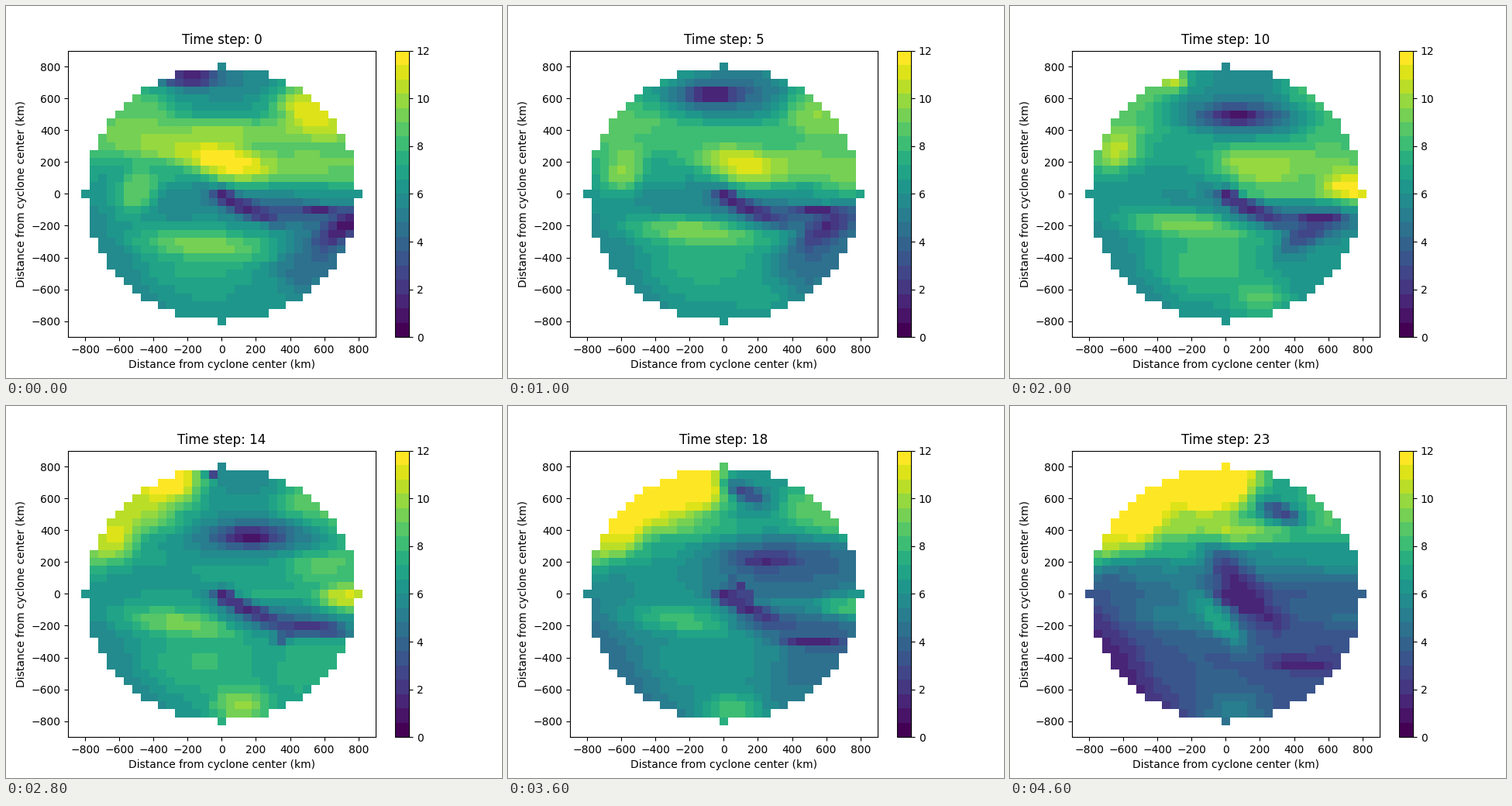
A matplotlib script that plays this animation: 640 by 480 pixels, repeating every 4.8 s.

```python
import numpy as np
import matplotlib.pyplot as plt
from matplotlib.animation import FuncAnimation

STEPS = 24
INTERVAL = 200
RADIUS = 800

km = np.arange(-RADIUS, RADIUS + 1, 50)
X, Y = np.meshgrid(km, km)
OUTSIDE = np.hypot(X, Y) > RADIUS


def ramp(t, start, end):
    """Smooth rise from 0 to 1 between two steps."""
    u = np.clip((t - start) / (end - start), 0, 1)
    return u * u * (3 - 2 * u)


def bump(t, peak, width):
    return np.exp(-((t - peak) / width) ** 2)


def paint(z, value, x, y, rx, ry, tilt=0, scale=1):
    """Pull the field towards a value inside a soft ellipse."""
    if scale < .02:
        return
    c, s = np.cos(np.radians(tilt)), np.sin(np.radians(tilt))
    u = ((X - x) * c + (Y - y) * s) / (rx * scale)
    w = ((Y - y) * c - (X - x) * s) / (ry * scale)
    z += (value - z) * np.exp(-np.hypot(u, w) ** 2.6)


def paint_background(z, t, early, mid, late):
    rise = ramp(t, 8, 20)
    dark = bump(t, 18.5, 3)

    # South and west
    paint(z, 5.5 - 4 * late, -620, -450, 550, 170, -52)
    paint(z, 7.4 + .8 * mid - 3.8 * late, -100, -430, 350, 200)
    paint(z, 4.2 + 3.9 * bump(t, 13, 3.5) - 1.3 * late, 560, -390, 330, 190, 45)
    paint(z, 5.6 + 1.3 * bump(t, 16, 5) - 1.2 * late, -270, -40, 300, 140)

    # Northern half
    paint(z, 6.8 + 2.9 * early + 2.6 * late, 0, 380, 700, 95)
    paint(z, 8.5 + .7 * early + 1.7 * rise, -500, 420, 270, 210)
    paint(z, 8.3 + .7 * early + 3.6 * rise, -540, 510, 430, 130, 48)
    paint(z, 8.8 + 2.5 * early, 540, 510, 280, 170, -35)
    paint(z, 9.3 - 4.7 * dark - 2 * late, 480, 190, 480, 140)
    paint(z, 6.3 + 2.4 * mid - 1.5 * dark - 2.7 * late, 380, 15, 360, 45)
    paint(z, 6.5 + 3.5 * early + late, -270, 270, 300, 110, -10)
    paint(z, 6.4 + early - late, -370, 130, 200, 80)
    paint(z, 5.6, 130, 720, 230, 130)


def paint_warm(z, t, mid, late):
    p = t / (STEPS - 1)
    arc = np.sin(np.pi * p)

    # Ridge climbing the western side, and the eastern rim sliding south
    paint(z, 9 + 3.2 * p, -500 - 140 * arc, 10 + 430 * np.sin(np.pi / 2 * p),
          150, 110, 60)
    paint(z, 9 + 3.4 * mid - 4 * late, 740, 200 - 15.5 * t, 180, 130 - 3 * t)

    # Inner core drifting east as it cools
    paint(z, 12.2 - .2 * t - 5 * ramp(t, 10, 18) + 3 * late,
          30 + 15 * t, 205 - 4 * t, 240, 110, -14)


def paint_north(z, t, late):
    # Trough sinking south-east
    x, y = 24 * t - 180, 730 - 18 * t - .6 * t * t
    paint(z, 5.3 - 1.4 * ramp(t, 0, 8), x + 40, y, 420,
          125 + 35 * ramp(t, 12, 18))
    paint(z, 1 + 2.5 * late, x, y, 160, 55)

    # Flood growing from the north-west
    size = ramp(t, 4, 22)
    paint(z, 9 + 5.5 * size, -310 + 210 * ramp(t, 14, 23), 715, 330, 270,
          scale=size)

    # Vortex on its eastern flank
    q, size = ramp(t, 13, 23), ramp(t, 11, 18)
    x, y = -60 + 390 * q, 755 - 245 * q
    paint(z, 5.8 + 1.2 * q, x + 30, y + 40, 190, 115, -30, size)
    paint(z, 2.8, x, y, 125, 60, -25, size)


def paint_south(z, t, late):
    arc = np.sin(np.pi * t / (STEPS - 1))
    paint(z, 9.4 - 3.9 * late, -100 - 90 * arc, -160 - 160 * np.exp(-t / 7),
          380, 85, -5)
    shift = ramp(t, 8, 18)
    paint(z, 6.5 + 3.2 * bump(t, 14, 6) - 1.8 * late,
          220 - 170 * shift, -640 - 90 * shift, 165, 115)


def paint_front(z, t, mid, late):
    paint(z, 3.6 + .7 * mid, 380, -110 - 5 * t, 400, 85, -6)
    paint(z, 1.5, 130, -85, 220, 48, -25)
    paint(z, 1 + .15 * t, 720 - 24 * t, -200 - 4 * t, 190, 75, 38,
          1 - ramp(t, 10, 18))
    paint(z, 1.4, 560 - 130 * late, -90 - .66 * t * t, 210, 38, -4,
          .6 + .02 * t)

    # The centre opens late, with a milder band along its western side
    paint(z, 1.6, 110, 20, 330, 105, -52, late)
    paint(z, 7.1, -60, -150, 240, 65, -48, late)
    paint(z, 1.6, 15, -5, 50, 45)


def field(t):
    early = np.exp(-t / 5)
    mid = bump(t, 11, 4)
    late = ramp(t, 14, 23) ** 1.5
    z = np.full(X.shape, 6.4 - 2.8 * late)
    paint_background(z, t, early, mid, late)
    paint_warm(z, t, mid, late)
    paint_north(z, t, late)
    paint_south(z, t, late)
    paint_front(z, t, mid, late)
    return np.ma.array(z, mask=OUTSIDE)


fig, ax = plt.subplots(figsize=(6.4, 4.8), dpi=100)
mesh = ax.pcolormesh(km, km, field(0), shading="nearest",
                     cmap=plt.get_cmap("viridis", 20), vmin=0, vmax=12)
fig.colorbar(mesh)
ax.set(xlim=(-900, 900), ylim=(-900, 900),
       xlabel="Distance from cyclone center (km)",
       ylabel="Distance from cyclone center (km)")
title = ax.set_title("Time step: 0")


def draw(step):
    mesh.set_array(field(step))
    title.set_text(f"Time step: {step}")
    return mesh, title


anim = FuncAnimation(fig, draw, frames=STEPS, interval=INTERVAL,
                     repeat=True, repeat_delay=0)
plt.show()
```
